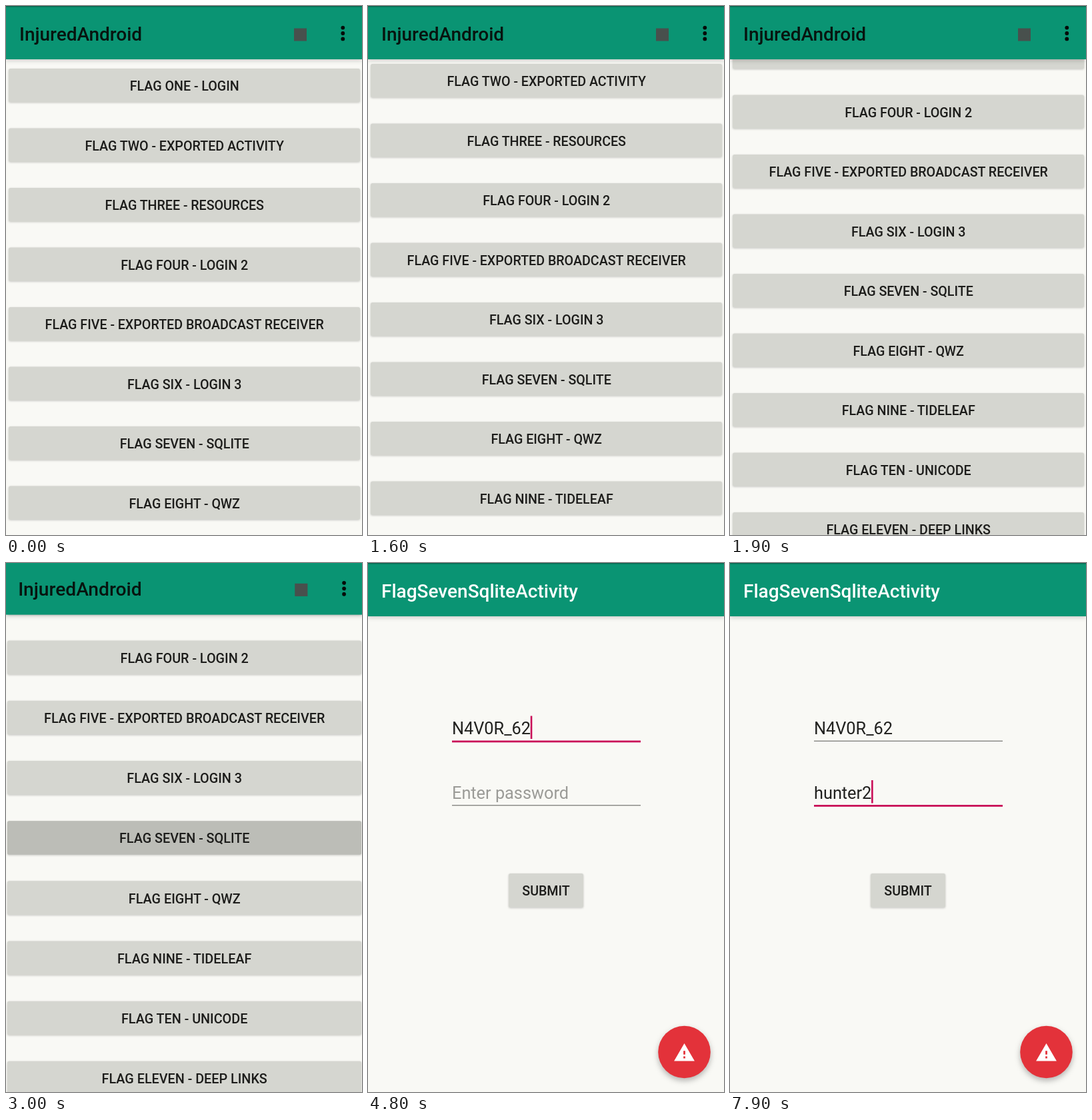
These frames come from a looping animation (534 by 794 pixels, 8000 ms). An HTML page:

```html
<!DOCTYPE html>
<html lang="en">
<head>
<meta charset="utf-8">
<title>InjuredAndroid</title>
<style>
  html, body { margin: 0; width: 100%; height: 100%; overflow: hidden; background: #f9f9f5; }
  svg { display: block; width: 534px; height: 794px; font-family: Roboto, sans-serif; }
  g.screen { transform-origin: 267px 397px; }
  .title { font-size: 28px; font-weight: 500; }
  .label { font-size: 19.65px; font-weight: 500; text-anchor: middle; fill: #1c1c1a; }
  .input { font-size: 25.3px; }
  .button { fill: #d5d6d0; filter: drop-shadow(0 1.5px 1.5px rgba(0, 0, 0, .2)); }
  .bar { fill: #0a9473; filter: drop-shadow(0 2px 3px rgba(0, 0, 0, .18)); }
  .fab { fill: #e3323a; filter: drop-shadow(0 4px 4px rgba(0, 0, 0, .28)); }
</style>
</head>
<body>
<svg viewBox="0 0 534 794">
  <g class="screen" id="menu">
    <rect width="534" height="794" fill="#f9f9f5"/>
    <g id="list"></g>
    <rect class="bar" width="534" height="80"/>
    <rect width="534" height="1.5" fill="#0a6650"/>
    <text class="title" x="20" y="52" fill="#07140f">InjuredAndroid</text>
    <rect x="432" y="33.5" width="19" height="19" fill="#48504d"/>
    <g fill="#060b09">
      <circle cx="505.3" cy="32.6" r="2.9"/>
      <circle cx="505.3" cy="41" r="2.9"/>
      <circle cx="505.3" cy="49.4" r="2.9"/>
    </g>
  </g>
  <g class="screen" id="form">
    <rect width="534" height="794" fill="#f9f9f5"/>
    <rect class="bar" width="534" height="80"/>
    <rect width="534" height="1.5" fill="#0a6650"/>
    <text class="title" x="20" y="52" fill="#fff">FlagSevenSqliteActivity</text>
    <g id="fields"></g>
    <rect class="button" x="211" y="466" width="112" height="51" rx="2.5"/>
    <text class="label" x="267" y="499">SUBMIT</text>
    <circle class="fab" cx="474.5" cy="734" r="39.3"/>
    <path transform="translate(457.7 718.2) scale(1.4)" fill="#fff"
      d="M1 21h22L12 2 1 21zm12-3h-2v-2h2v2zm0-4h-2v-4h2v4z"/>
  </g>
</svg>
<script>
const LOOP = 8000, STEP = 100, PITCH = 89.5;
const $ = id => document.getElementById(id);
const flags = ['ONE - LOGIN', 'TWO - EXPORTED ACTIVITY', 'THREE - RESOURCES', 'FOUR - LOGIN 2',
  'FIVE - EXPORTED BROADCAST RECEIVER', 'SIX - LOGIN 3', 'SEVEN - SQLITE', 'EIGHT - QWZ',
  'NINE - TIDELEAF', 'TEN - UNICODE', 'ELEVEN - DEEP LINKS'];

function add(parent, tag, attrs) {
  const el = document.createElementNS('http://www.w3.org/2000/svg', tag);
  for (const key in attrs) el.setAttribute(key, attrs[key]);
  return parent.appendChild(el);
}

let press;
flags.forEach((name, i) => {
  const box = { x: 4, y: 94 + PITCH * i, width: 527, height: 50.3, rx: 2.5 };
  add($('list'), 'rect', { ...box, class: 'button' });
  if (i === 6) press = add($('list'), 'rect', { ...box, fill: '#bcbdb7' });
  add($('list'), 'text', { class: 'label', x: 267.7, y: 127 + PITCH * i }).textContent = 'FLAG ' + name;
});

// times: when each character appears; from/to: when the field has focus
const fields = [
  { y: 0, hint: 'Enter username', value: 'N4V0R_62', from: 3300, to: 5600,
    times: [3800, 3900, 4100, 4300, 4400, 4600, 4700, 4800] },
  { y: 96.5, hint: 'Enter password', value: 'hunter2', from: 5600, to: LOOP,
    times: [6000, 6100, 6300, 6600, 7000, 7400, 7800] }
];
for (const f of fields) {
  const g = add($('fields'), 'g', { transform: `translate(0 ${f.y})` });
  f.text = add(g, 'text', { class: 'input', x: 126, y: 257 });
  f.line = add(g, 'rect', { x: 126, width: 283 });
  f.cursor = add(g, 'rect', { y: 229.5, width: 2.6, height: 34.5, fill: '#c90f58' });
}

function drawField(f, t) {
  const typed = f.times.filter(at => at <= t);
  const focused = t < f.to && (t >= f.from || f.y === 0);
  f.text.textContent = typed.length ? f.value.slice(0, typed.length) : f.hint;
  f.text.setAttribute('fill', typed.length ? '#21211f' : '#9b9b97');
  f.line.setAttribute('y', focused ? 266.5 : 266.6);
  f.line.setAttribute('height', focused ? 2.8 : 1.3);
  f.line.setAttribute('fill', focused ? '#c90f58' : '#7d7d79');
  const end = typed.length ? f.text.getComputedTextLength() : 0;
  const last = typed.length ? typed[typed.length - 1] : f.from;
  f.cursor.setAttribute('x', 125.7 + end);
  f.cursor.setAttribute('opacity', focused && (t - last + LOOP) % 1000 < 500 ? 1 : 0);
}

// value held for each step after start, last one kept
const at = (values, start, t) =>
  values[Math.max(0, Math.min(values.length - 1, (t - start) / STEP))];

function draw(now) {
  const t = Math.floor(now % LOOP / STEP) * STEP;
  const scroll = at([0, 36, 55, 74, 96.5, 150, 198, 229, 240, 243.8], 1200, t);
  const open = at([0, .15, .93, .98, .995, 1], 2900, t);
  $('list').setAttribute('transform', `translate(0 ${-scroll})`);
  press.setAttribute('opacity', Math.max(0, Math.min(1, (t - 2700) / 300)));
  $('menu').style.transform = `scale(${1 + .05 * open})`;
  $('form').style.transform = `scale(${.85 + .15 * open})`;
  $('form').style.visibility = t >= 3100 ? 'visible' : 'hidden';
  for (const f of fields) drawField(f, t);
}

const start = performance.now();
function tick() {
  draw(performance.now() - start);
  requestAnimationFrame(tick);
}
tick();
</script>
</body>
</html>
```
